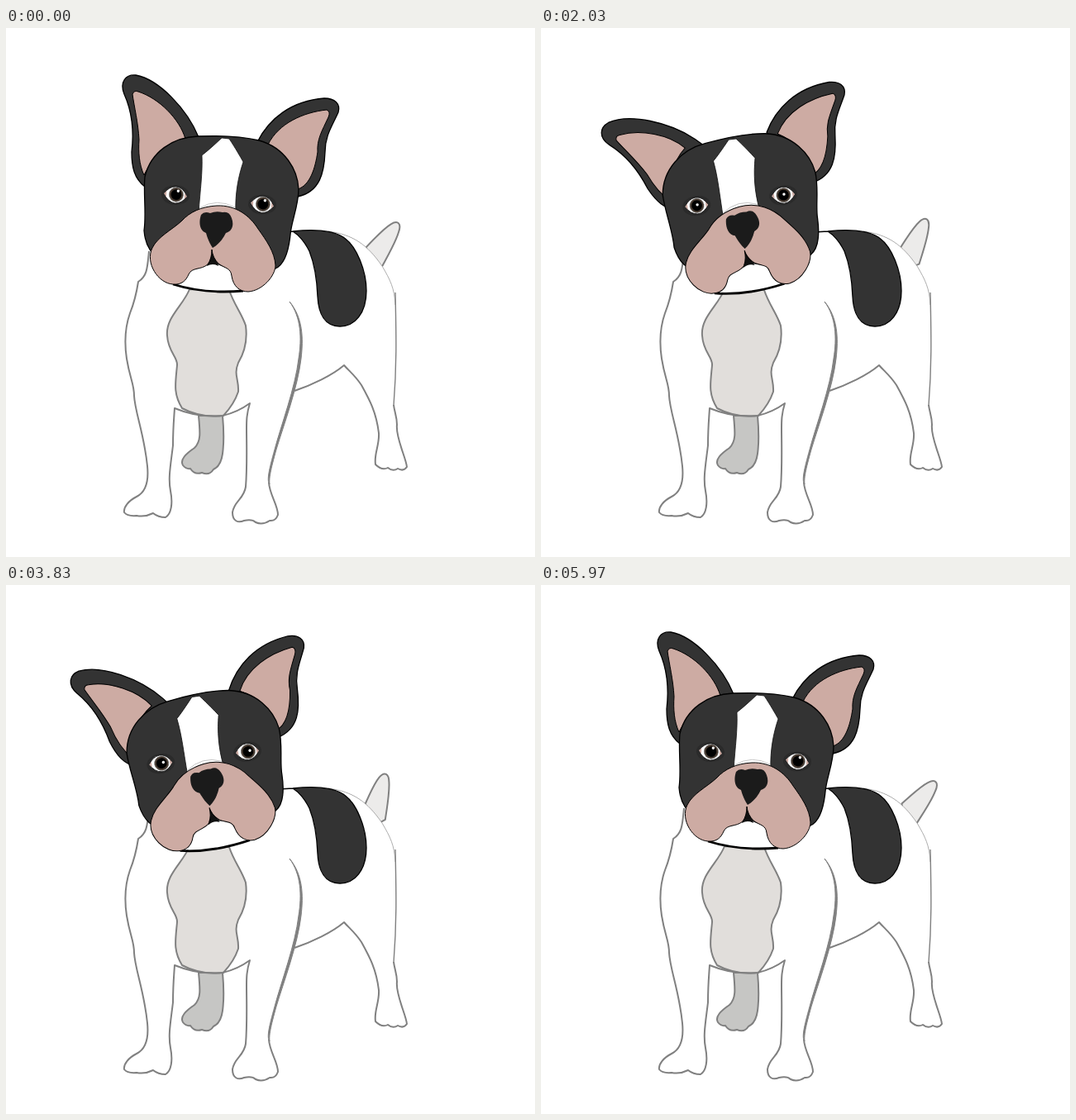
Recreate the animation shown at these times as an HTML page. Size 640 by 640 pixels, loop 6010 ms.

```html
<!DOCTYPE html>
<html lang="en">
<head>
<meta charset="utf-8">
<title>Dog</title>
<style>
html, body { margin: 0; width: 100%; height: 100%; overflow: hidden; background: #fff }
svg { display: block; width: 100vw; height: 100vh }
.line { stroke: #808080; stroke-width: 2; stroke-linejoin: round }
.dark { fill: #333; stroke: #000; stroke-width: 1.3 }
.pink { fill: #cdaba3; stroke: #000; stroke-width: 1 }
</style>
</head>
<body>
<svg viewBox="0 0 640 640" fill="none">
  <path id="tail" class="line" fill="#ecebea" d="M436 265C446 255 458 243 467 238C476 233 480 238 476 248C472 260 462 276 455 288L440 290Z"/>

  <!-- body -->
  <path class="line" fill="#c6c6c4" d="M233 469C235 490 236 500 228 508C218 515 210 522 214 529Q218 534 223 533Q228 541 237 538Q246 542 251 534Q260 530 262 515C264 500 263 480 262 469Z"/>
  <path fill="#fff" d="M335 247L390 246C420 250 437 262 455 288C465 305 470 315 471 335V420H349L300 453Q240 480 204 460L180 300Z"/>
  <path stroke="#999" stroke-width=".8" d="M390 246C420 250 437 262 455 288C465 305 470 315 471 335"/>
  <path stroke="#808080" stroke-width="1.4" d="M471 320C472 370 473 405 469 457"/>
  <path class="line" d="M469 456C470 465 473 470 473 480C471 495 484 520 485 531Q481 537 474 533Q468 537 462 532Q455 536 447 528C445 515 452 505 451 490C448 465 440 450 430 432C422 420 415 415 409 408C395 420 370 432 349 439"/>
  <path class="line" fill="#e1dedb" d="M222 316C215 335 193 350 195 372C196 392 208 398 207 408C205 430 202 442 213 460Q235 472 263 469Q276 455 281 440C282 425 275 420 281 405C290 390 292 375 290 360C285 345 276 335 270 317Z"/>
  <path class="line" d="M173 270C171 290 171 300 160 307C158 320 156 330 150 345C144 362 143 380 146 400C150 425 155 430 155 445C156 465 167 490 171 530C173 550 168 562 158 567C148 572 142 580 143 586Q147 591 158 590Q168 592 178 587Q184 592 193 592C200 588 202 575 199 560C196 545 199 530 202 505C202 485 203 475 204 460Q233 472 262 469Q280 465 295 454C291 467 291 475 291 485C291 500 292 530 290 555C288 570 276 572 274 586C274 597 281 599 288 596Q298 594 302 598Q310 602 319 596Q326 597 329 589C329 577 319 565 318 550"/>
  <path fill="#808080" stroke="#808080" d="M343 331C359 350 360 375 357 400C353 435 336 480 327 510C320 535 318 545 319 552L318 551C316 545 318 535 325 510C333 480 350 435 354 400C358 375 357 350 343 331Z"/>
  <path class="dark" d="M330 247L347 246C375 243 395 245 408 253C425 264 436 295 436 318C436 345 422 361 404 361C386 361 378 346 377 325C376 300 373 285 367 270C362 260 355 251 347 246"/>

  <g id="head">
    <g id="earL">
      <path class="dark" d="M168 192C155 182 152 168 152 150C155 125 152 100 143 80C137 65 145 56 157 57C185 62 219 98 233 132L239 148L210 175Z"/>
      <path class="pink" d="M153 80Q155 75 160 77C185 85 210 110 217 134C195 140 178 155 167 178C161 165 160 150 161 135C160 115 155 95 153 80Z"/>
    </g>
    <g id="earR">
      <path class="dark" d="M304 138C318 110 345 88 385 85C398 85 405 92 402 102C395 118 386 130 386 150C385 175 380 198 353 204L320 170Z"/>
      <path class="pink" d="M317 141C330 115 360 102 388 99Q393 101 390 108C382 125 376 135 377 150C374 170 368 190 353 195C350 170 338 152 317 141Z"/>
    </g>
    <path class="dark" d="M232 131C202 132 175 150 168 180C166 200 170 225 167 245C168 257 172 265 174 268L200 300H300L326 291C337 286 342 270 344 250C345 235 354 215 354 195C353 172 338 145 306 136Q278 129 232 131Z"/>
    <path fill="#fff" stroke="#111" stroke-width=".8" d="M261 133L270 134C278 146 283 155 287 162C281 180 277 200 278 224H233C235 195 238 175 237 154Q245 148 261 133Z"/>
    <path stroke="#bbb" stroke-width=".8" d="M234 218Q255 205 277 217"/>
    <path fill="#fff" d="M205 309L222 292L250 284L274 293L288 318Q240 322 205 309Z"/>
    <path stroke="#000" stroke-width="2.8" d="M202 310Q240 322 287 318"/>
    <path fill="#111" d="M249 264L257 288Q250 284 243 288Z"/>
    <path class="pink" d="M255 215C236 216 222 223 213 233C200 245 184 252 177 266C168 284 184 309 202 310C213 311 218 305 221 298C225 289 236 293 244 286Q249 279 249 268Q250 278 257 285C265 291 272 290 273 300C275 313 283 319 293 319C310 318 326 300 326 287C325 271 315 257 305 243C295 227 278 214 255 215Z"/>
    <path fill="#1b1b1b" d="M236 226Q240 221 247 224Q254 221 262 223Q270 221 273 230C276 238 274 246 266 248C262 256 257 262 250 266C246 260 244 255 242 248C234 245 233 235 236 226Z"/>
    <g id="eyes"></g>
  </g>
</svg>
<script>
const $ = id => document.getElementById(id);

const eye = (x, y) => `<g transform="translate(${x} ${y}) rotate(4)">
  <ellipse rx="17" ry="12" fill="#2a2a2a"/>
  <path d="M-14 -1Q-8 -10 0 -10Q9 -10 14 1Q8 10 0 10Q-9 9 -14 -1Z" fill="#fff" stroke="#111" stroke-width=".8"/>
  <path d="M-14 -1L-11 -4V3ZM14 1L11 -3V4Z" fill="#cdaba3"/>
  <g class="iris"><circle r="8.6" fill="#46392f" stroke="#777" stroke-width=".6"/>
  <circle r="6.4" fill="#000"/></g><circle class="glint" r="1.7" fill="#fff"/></g>`;
$('eyes').innerHTML = eye(205, 202) + eye(310, 213.5);
const irises = document.querySelectorAll('.iris');
const glints = document.querySelectorAll('.glint');

// Frames at which the tail turns, alternating between its two ends
const turns = [-8, 8, 19, 27, 37, 48, 57, 65, 74, 83, 90, 97, 104, 111, 121, 131, 142, 158];
// Frame, then glint offset
const gaze = [[0, 3, -5], [17, 3, -5], [25, 1, -1], [60, 1, -1], [72, 4, 3], [82, 4, 3],
  [100, 3, -2], [118, 4, 0], [130, 4, 0], [147, 3, -5], [151, 3, -5]];

const ramp = (t, a, b) => Math.max(0, Math.min(1, (t - a) / (b - a)));
const turn = (id, angle, x, y) => $(id).setAttribute('transform', `rotate(${angle} ${x} ${y})`);

function draw(now) {
  const t = now % 6010;
  const frame = Math.min(149, Math.round(t / 40 - .01));
  const ms = frame * 40;

  const i = turns.findIndex(f => f > frame) - 1;
  const swing = Math.cos(Math.PI * ramp(frame, turns[i], turns[i + 1])) * (i % 2 ? -1 : 1);
  turn('tail', -2 + 22 * swing, 446, 276);

  const down = ramp(ms, 1650, 2065);
  const tilt = down - ramp(ms, 4510, 4860);
  const droop = down - ramp(ms, 3670, 4070);
  turn('head', -14 * tilt, 253, 281);
  turn('earL', -22 * droop, 203, 159);
  turn('earR', 8 * droop, 330, 165);

  const k = gaze.findIndex(g => g[0] > frame);
  const [a, b] = [gaze[k - 1], gaze[k]];
  const p = ramp(frame, a[0], b[0]);
  const x = a[1] + (b[1] - a[1]) * p, y = a[2] + (b[2] - a[2]) * p;
  glints.forEach(g => g.setAttribute('transform', `translate(${x} ${y})`));
  irises.forEach(g => g.setAttribute('transform', `translate(${x * .3} ${y * .1})`));
  requestAnimationFrame(loop);
}
const start = performance.now();
function loop() { draw(performance.now() - start); }
loop();
</script>
</body>
</html>
```
